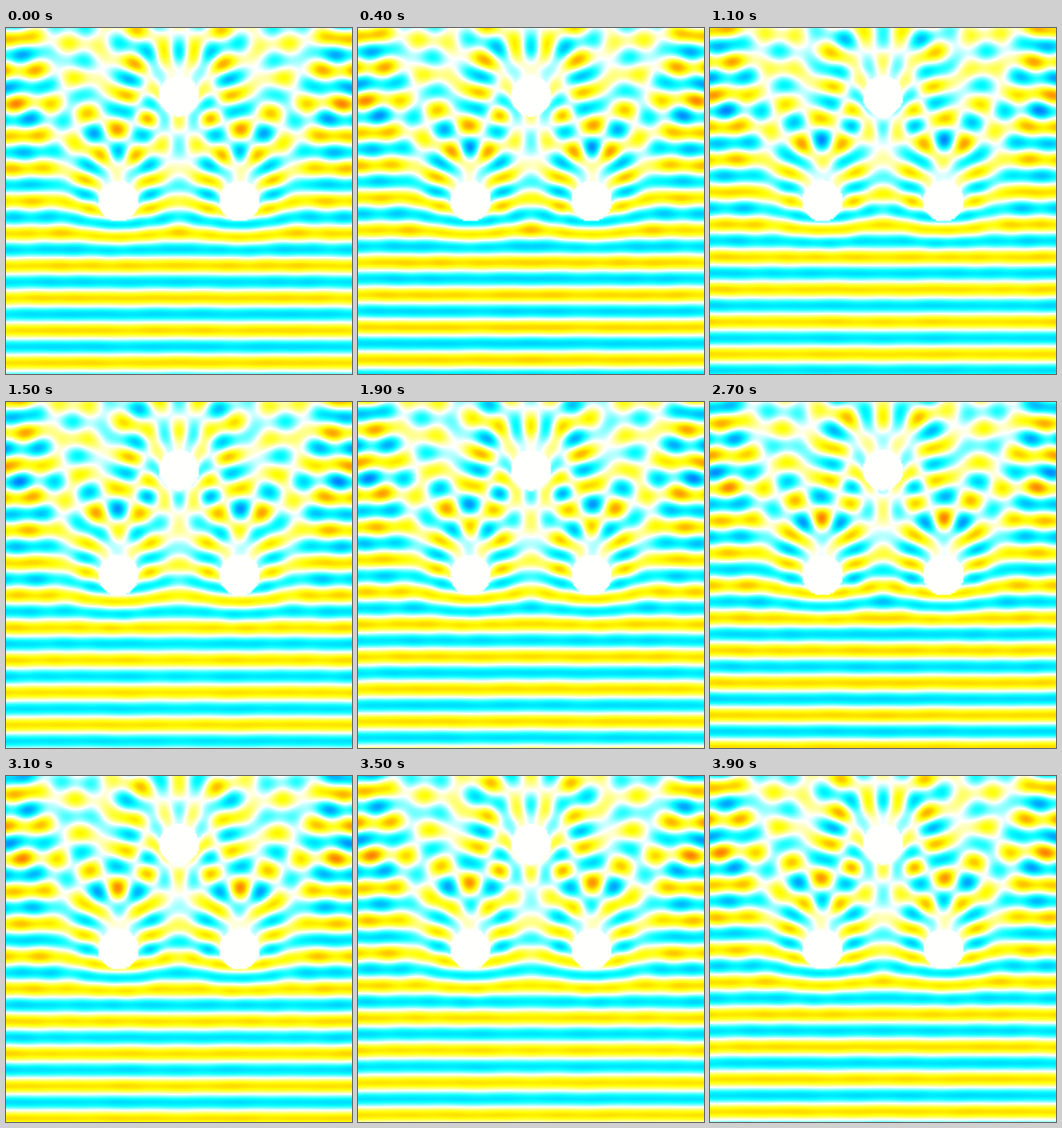
Write a matplotlib script that moves like this. It is 400x400 px and loops after 4 s.

```python
import numpy as np
import matplotlib.pyplot as plt
from matplotlib.animation import FuncAnimation
from matplotlib.colors import LinearSegmentedColormap

SIZE, STEP, FRAMES = 400, 2, 40
K = 2 * np.pi / 37.43            # wavenumber outside the lenses
CREST = 387.3                    # height of one incident crest at the start
CORE, RIM = 23.5, 70.0           # absorber radius, lens radius
RISE = RIM * np.sqrt(3)
CENTRES = [(130, 200), (270, 200), (200, 200 - RISE)]
M = 18
ORDERS = np.arange(-M, M + 1)
LIMIT = 3.2


def index2(r):
    """Squared refractive index of a lens."""
    return 1 + 0.9 * (1 - r**2 / RIM**2)


def bessel_j(x, top):
    """J_0..J_top by downward recurrence."""
    start = 2 * ((int(max(x.max(), top)) + 40) // 2)
    j = np.zeros((start + 2, x.size))
    j[start] = 1e-30
    for n in range(start, 0, -1):
        j[n - 1] = 2 * n / x * j[n] - j[n + 1]
        big = np.abs(j[n - 1]) > 1e100
        j[:, big] *= 1e-100
    return j / (j[0] + 2 * j[2::2].sum(axis=0))


def bessel_jh(x, top):
    """J and outgoing Hankel functions of orders 0..top."""
    x = np.atleast_1d(np.asarray(x, float))
    j = bessel_j(x, top)
    log = np.log(x / 2) + np.euler_gamma
    n = np.arange(1, (len(j) - 2) // 2)
    s = ((-1.0) ** n / n)[:, None]
    y = np.zeros((top + 1, x.size))
    y[0] = 2 / np.pi * log * j[0] - 4 / np.pi * (s * j[2 * n]).sum(axis=0)
    slope = (j[2 * n - 1] - j[2 * n + 1]) / 2
    y[1] = (2 / np.pi * (log * j[1] - j[0] / x)
            + 4 / np.pi * (s * slope).sum(axis=0))
    for m in range(1, top):
        y[m + 1] = 2 * m / x * y[m] - y[m - 1]
    return j[:top + 1], j[:top + 1] + 1j * y


def signed(f, orders):
    """Pick integer orders of either sign from a table of orders >= 0."""
    flip = np.where((orders < 0) & (orders % 2 == 1), -1, 1)
    return f[np.abs(orders)] * flip[:, None]


def lens_modes(steps=280):
    """Radial modes inside a lens around a matched absorbing core."""
    m2 = np.arange(M + 1.0) ** 2
    r = np.linspace(CORE, RIM, steps + 1)
    dr = r[1] - r[0]

    def rate(q, s):
        return np.array([s[1] / q, (m2 / q - K**2 * index2(q) * q) * s[0]])

    one = np.ones(M + 1, complex)
    s = np.array([one, -1j * K * np.sqrt(index2(CORE)) * CORE * one])
    track = [s]
    for q in r[:-1]:
        a = rate(q, s)
        b = rate(q + dr / 2, s + dr / 2 * a)
        c = rate(q + dr / 2, s + dr / 2 * b)
        d = rate(q + dr, s + dr * c)
        s = s + dr / 6 * (a + 2 * b + 2 * c + d)
        track.append(s)
    return r, np.array(track)[:, 0].T, s


def solve():
    """Multiple scattering between the three lenses."""
    r_in, modes, (u, p) = lens_modes()
    j, h = bessel_jh(K * RIM, M + 1)
    j, h = j[:, 0], h[:, 0]
    n = np.arange(M + 1)
    dj, dh = (n / (K * RIM) * f[:-1] - f[1:] for f in (j, h))
    j, h = j[:-1], h[:-1]
    t = -(j * p - K * RIM * dj * u) / (h * p - K * RIM * dh * u)
    inner = (j + t * h) / u / t
    tm = t[np.abs(ORDERS)]

    size = len(ORDERS)
    system = np.eye(3 * size, dtype=complex)
    drive = np.zeros(3 * size, complex)
    diff = ORDERS[None, :] - ORDERS[:, None]
    for a, (xa, ya) in enumerate(CENTRES):
        rows = slice(a * size, (a + 1) * size)
        drive[rows] = tm * np.exp(-1j * K * (ya - CREST))
        for b, (xb, yb) in enumerate(CENTRES):
            if a == b:
                continue
            gap, ang = np.hypot(xa - xb, ya - yb), np.arctan2(yb - ya, xa - xb)
            table = signed(bessel_jh(K * gap, 2 * M)[1], diff.ravel())
            shift = table.reshape(diff.shape) * np.exp(1j * diff * ang)
            system[rows, b * size:(b + 1) * size] = -tm[:, None] * shift
    coef = np.linalg.solve(system, drive).reshape(3, size)
    return r_in, modes, inner, coef


def wave_field():
    r_in, modes, inner, coef = solve()
    axis = np.arange(0, SIZE + 1, STEP, dtype=float)
    x, y = np.meshgrid(axis, axis)
    field = np.exp(-1j * K * (y - CREST))
    r_out = np.linspace(RIM - 1, 460, 3000)
    hankel = bessel_jh(K * r_out, M)[1]
    lenses = []
    for (cx, cy), c in zip(CENTRES, coef):
        r, ang = np.hypot(x - cx, y - cy), np.arctan2(cy - y, x - cx)
        near = np.zeros_like(field)
        for m, cm in zip(ORDERS, c):
            i = abs(m)
            sign = -1 if m < 0 and m % 2 else 1
            spin = sign * cm * np.exp(1j * m * ang)
            field += spin * np.interp(r, r_out, hankel[i])
            near += spin * inner[i] * np.interp(r, r_in, modes[i])
        lenses.append((r, near))
    for r, near in lenses:
        field[r < RIM] = near[r < RIM]
        field[r < CORE] = 0
    return field


cmap = LinearSegmentedColormap.from_list("wave", [
    (0, (0, 0, 0.5)), (0.125, (0, 0, 1)), (0.375, (0, 1, 1)), (0.5, (1, 1, 1)),
    (0.625, (1, 1, 0)), (0.875, (1, 0, 0)), (1, (0.5, 0, 0))], N=512)

field = wave_field()
fig = plt.figure(figsize=(4, 4), dpi=100)
ax = fig.add_axes([0, 0, 1, 1])
ax.axis("off")
half = STEP / 2
image = ax.imshow(field.real, cmap=cmap, vmin=-LIMIT, vmax=LIMIT,
                  interpolation="bilinear",
                  extent=(-half, SIZE + half, SIZE + half, -half))
ax.set_xlim(0, SIZE)
ax.set_ylim(SIZE, 0)


def update(i):
    image.set_data((field * np.exp(-2j * np.pi * i / FRAMES)).real)
    return [image]


anim = FuncAnimation(fig, update, frames=FRAMES, interval=100, repeat=True)
plt.show()
```
